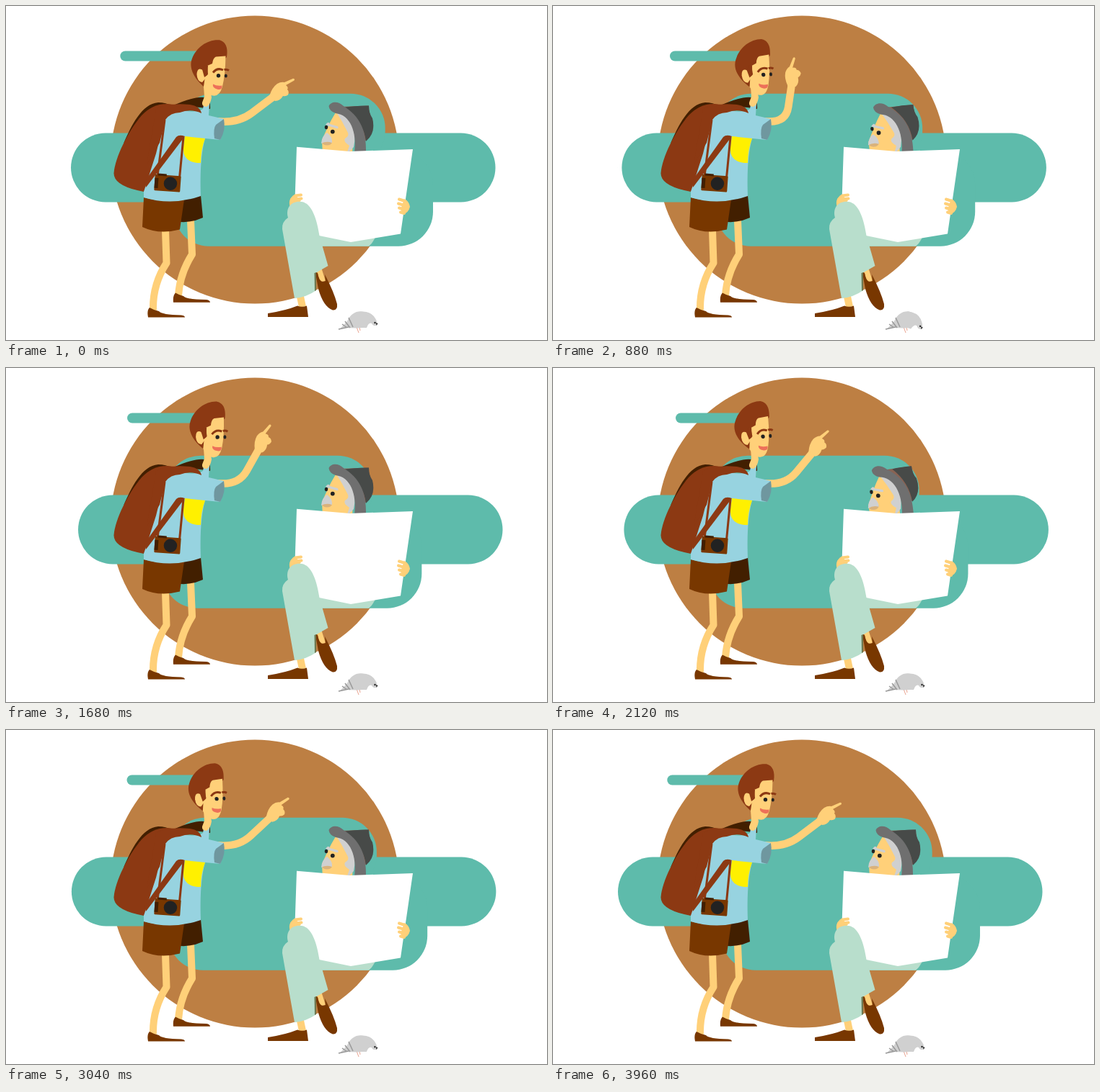
Write an HTML page that moves like this. It is 750 by 464 pixels and loops after 4 s.

```html
<!DOCTYPE html>
<html lang="en">
<head>
<meta charset="utf-8">
<title>Asking the way</title>
<style>
html, body { margin: 0; width: 100%; height: 100%; overflow: hidden; background: #fff; }
svg { display: block; width: 100vw; height: 100vh; }
.teal { fill: #5ebbab; }
.skin { fill: #ffd079; }
.rust { fill: #8c3913; }
.brown { fill: #783700; }
.dark { fill: #421f00; }
.shirt { fill: #97d3e0; }
.pale { fill: #b8decc; }
.grey { fill: #d0d0d0; }
.ink { fill: #222; }
.line { fill: none; stroke-linejoin: round; }
.limb { fill: none; stroke: #ffd079; stroke-width: 10; stroke-linejoin: round; }
.finger { fill: none; stroke: #ffd079; stroke-width: 4; stroke-linecap: round; }
</style>
</head>
<body>
<svg viewBox="0 0 750 464">
  <circle cx="345" cy="213.5" r="200" fill="#bd7f43"/>
  <g class="teal">
    <rect id="wide" x="90" y="176.5" width="588.5" height="96" rx="48"/>
    <rect id="upper" x="240" y="121.7" width="285.7" height="100" rx="48"/>
    <rect id="lower" x="233" y="200" width="359" height="133.7" rx="48"/>
    <rect id="small" x="158.3" y="62.5" width="112" height="14" rx="7"/>
  </g>

  <g id="man">
    <path class="dark" d="M163 191C174 166 188 136 211 134Q222 134 230 139L200 160ZM232 138Q262 125 275 127Q284 129 283 143L270 141Z"/>
    <path class="limb" d="M221 311L222.500 357Q203 387 204 423M256 298L258 345Q241 372 239 402"/>
    <path class="brown" d="M197 432.500Q195 423 199 419Q206 423 212 424Q216 429 243 429.500Q248 430 248 432.500ZM232 411.700Q231 402 235 398.500Q241 402 246 403Q251 408 278 408Q283 409 283 411.700Z"/>
    <path class="dark" d="M245 269L270 263L273 294Q258 301 242 300Z"/>
    <path class="brown" d="M191 266Q220 274 247 269L241 310.500Q212 318 189 307Z"/>
    <path class="rust" d="M149.500 232C151 211 169 174 188 152Q207 132 232 137L236 160L191 258Q149 250 149.500 232Z"/>
    <path id="arm" class="limb" style="stroke-width:10.500"/>
    <g id="hand">
      <path class="skin" d="M365.500 124Q369 113 376 108Q381 105 386 106L398 100.700Q401 101 399.500 103.500L388 110Q392 113 390 116Q393 119 391 123.500Q388 126 384 125Q380 132 373 132Z"/>
    </g>
    <path class="shirt" d="M274 137L282 136L281 152L302 157Q303 170 297 186L276 184Q268 212 270 264Q230 278 191 266L191 258L208 205L219 160Q226 146 246 145Q263 149 273 143Z"/>
    <path d="M302 157Q305 172 297 186L289 184Q287 170 291 165Z" fill="#6f979f"/>
    <path d="M248 181L276 184Q270 200 270 218Q244 218 246 196Z" fill="#fff000"/>
    <path class="rust" d="M208 143Q225 134 255 137Q269 139 271 149Q256 142 241 148Q228 148 221 158L213 190L195 220Z"/>
    <path class="rust" d="M192 244L236 182Q240 178 248 181L194 252Z"/>
    <path class="line" d="M220 158L210 236M246 182L240.500 239" stroke="#8c3913" stroke-width="3"/>
    <g transform="rotate(4 224 246)">
      <rect class="brown" x="206" y="235" width="36" height="22.500" rx="1.500"/>
      <rect class="dark" x="206" y="240" width="5" height="14"/>
      <rect class="dark" x="210" y="233.500" width="12" height="3"/>
      <circle class="ink" cx="228" cy="246.500" r="9.200"/>
    </g>
    <path class="skin" d="M274 112H286Q283 120 285 127Q283 139 277 140Q271 139 272 134L275 126Z"/>
    <g id="head">
      <path class="rust" d="M274 112C257 97 254 83 258 73C264 57 280 46 296 47.300Q309 51 306 71L282 92Z"/>
      <path class="skin" d="M274 112L276 98L280 95L279 83L286 80Q287 72 291 70.500L304.500 69.500Q304 96 300 112Q296 126 287 124.500Q280 124 274 112Z"/>
      <path class="skin" d="M273 89Q265 84 264.500 95Q265 105 272 106L277 100Z"/>
      <path class="rust" d="M272 88L276 82L280 83L279 96L275 99Z"/>
      <path class="line" d="M287 92.500Q293 85 301 89M302.500 88.500Q306 87.500 309 89.500" stroke="#8c3913" stroke-width="3"/>
      <circle class="ink" cx="294.500" cy="96.700" r="2.700"/>
      <ellipse class="ink" cx="304.800" cy="97" rx="2" ry="2.600"/>
      <path d="M287 108.500Q292 111.500 299.500 110.500Q300 116.500 294 116Q285.500 114 287 108.500Z" fill="#ed7059"/>
    </g>
  </g>

  <g id="reader">
    <g id="face">
      <path class="skin" d="M457 148Q451 158 447 166L438 186L439 206H480L482 165Z"/>
      <path class="grey" d="M455 146Q473 146 481 162Q486 178 482 196L472 206L476 194Q467 188 470 184Q477 180 473 174Q466 160 459 149Z"/>
      <ellipse cx="445" cy="189" rx="7" ry="4.500" fill="#d9b27c"/>
      <path class="grey" d="M437 191Q438 180 445 176Q453 182 452 190Q444 187 437 191ZM443 165Q447 159 449 164L460 167Q462 171 458 170L448 167Z"/>
      <circle class="ink" cx="452.800" cy="174.600" r="2.900"/>
      <ellipse class="ink" cx="444" cy="168.500" rx="2.200" ry="2.800"/>
      <path d="M462 140L503 138.500Q503 149 508 158Q512 178 497 188Z" fill="#896353"/>
      <path id="crown" fill="#474a48"/>
      <path d="M447.500 139C450 133 460 131 468 139C490 153 500 172 499 204L483 204C487 175 477 151 457 149Q448 146 447.500 139Z" fill="#6f6f6f"/>
    </g>
    <path class="pale" d="M430 315L514 316Q510 328 503 333.700H438Z"/>
    <path class="limb" d="M407 399L411 418M433 367L438 383"/>
    <path class="brown" d="M363 432V427Q388 423 404 416.500Q410 419 417 416.500L419 432ZM429 371Q432 368 433 375Q436 386 443 382L442 373Q455 398 459 414Q460 423 453 422.500Q440 418 433 393Z"/>
    <path d="M403 195.700L476 202L564 199L547 316.500L478 328L434 319L400 285Z" fill="#fff"/>
    <path class="skin" d="M394 280Q390 268 400 262L409 270L402 279Z"/>
    <path class="finger" d="M401 263.500L409 262.500M401 268.500L409.500 267.500"/>
    <path class="skin" d="M552 268Q559 271 560 279Q558 287 551 289L547 283Z"/>
    <path class="finger" d="M545 268.500L553 271M544 274.500L554 277.500M545 280.500L554 283M547 286.500L552 288"/>
    <path class="pale" d="M391 294C387 279 397 270 410 272C424 274 431 296 434.500 319L446.500 361L429 371L430 395Q416 405 400 406L383 310Q382 300 391 294Z"/>
    <path d="M427.500 371L430 370V395L428 396Z" fill="#6e7850"/>
  </g>

  <g id="pigeon">
    <path class="line" d="M486 446L489 454M490 446L491 451" stroke="#e9a28f"/>
    <g id="beak">
      <path class="grey" d="M489 425Q505 422 512 434Q515 438 514 443Q510 446 507 441Q503 439 500 447L486 447Z"/>
      <circle class="ink" cx="511.500" cy="440" r="1.200"/>
      <path class="ink" d="M513 440L515.500 441L513.500 444Z"/>
    </g>
    <path class="grey" d="M473 438Q480 423 494 424.500Q506 428 503 441Q498 448 486 447.500L471 447L462 449.500Z"/>
    <path class="line" d="M461 449L475 446M466 442L473 447M470 438L477 447M475 433L481 446" stroke="#999" stroke-width="1.500"/>
  </g>
</svg>
<script>
const LOOP = 4000;
const $ = id => document.getElementById(id);
const ease = p => (1 - Math.cos(Math.PI * p)) / 2;

// Keys are [time, value] pairs, joined by sine easing.
function track(t, keys) {
  for (let i = 1; i < keys.length; i++) {
    const [t0, a] = keys[i - 1], [t1, b] = keys[i];
    if (t < t1) return a + (b - a) * ease((t - t0) / (t1 - t0));
  }
  return keys[keys.length - 1][1];
}

const headKeys = [[0, 0], [560, -6.5], [1450, -1.4], [2200, -6.3], [2650, -6.3], [3700, 0]];
const armKeys = [[0, 0], [520, -44], [1200, -44], [2000, -13.7], [2720, -13.7], [3320, 0]];
const tiltKeys = [[0, 0], [420, 1], [640, 1], [1200, 0], [1680, 0], [2080, 1], [2240, 1], [2700, 0]];
const upperKeys = [[0, 0], [1320, -18], [2400, -18], [4000, 0]];
const smallKeys = [[0, 0], [2350, 12], [2600, 12], [3980, 0]];
const pecks = [[100, 500], [620, 1100], [2160, 2680], [3000, 3600]];

const slide = (id, x) => $(id).setAttribute("transform", `translate(${x} 0)`);
const turn = (id, a, x, y) => $(id).setAttribute("transform", `rotate(${a} ${x} ${y})`);

function drawArm(angle) {
  const a = angle * Math.PI / 180, c = Math.cos(a), s = Math.sin(a);
  const px = 330, py = 167, dx = 42, dy = -42;
  const wx = px + dx * c - dy * s, wy = py + dx * s + dy * c;
  const ex = 323, ey = 162, k = 22 / Math.hypot(wx - ex, wy - ey);
  const bx = ex + (wx - ex) * k, by = ey + (wy - ey) * k;
  $("arm").setAttribute("d", `M288 160L297 160.5Q${ex} ${ey} ${bx} ${by}L${wx} ${wy}`);
  turn("hand", angle, px, py);
}

function drawReader(tilt) {
  const x = 467 + 9 * tilt, y = 141 - tilt;
  $("crown").setAttribute("d",
    `M${x} ${y}Q487 138 503 138.500Q503 149 508 156Q513 177 499 188Q${496 + tilt} 160 ${x} ${y}Z`);
  turn("face", -6 * tilt, 478, 195);
}

function render(t) {
  slide("wide", t < 3360 ? 10 * ease(t / 1680) : 0);
  slide("lower", -16.7 * ease(t / 2000));
  slide("upper", track(t, upperKeys));
  slide("small", track(t, smallKeys));
  turn("head", track(t, headKeys), 279, 128);
  drawArm(track(t, armKeys));
  drawReader(track(t, tiltKeys));
  const peck = pecks.find(([a, b]) => t > a && t < b);
  turn("beak", peck ? 16 * ease(2 * (t - peck[0]) / (peck[1] - peck[0])) : 0, 493, 434);
}

const start = performance.now();
function tick() {
  render((performance.now() - start) % LOOP);
  requestAnimationFrame(tick);
}
tick();
</script>
</body>
</html>
```
